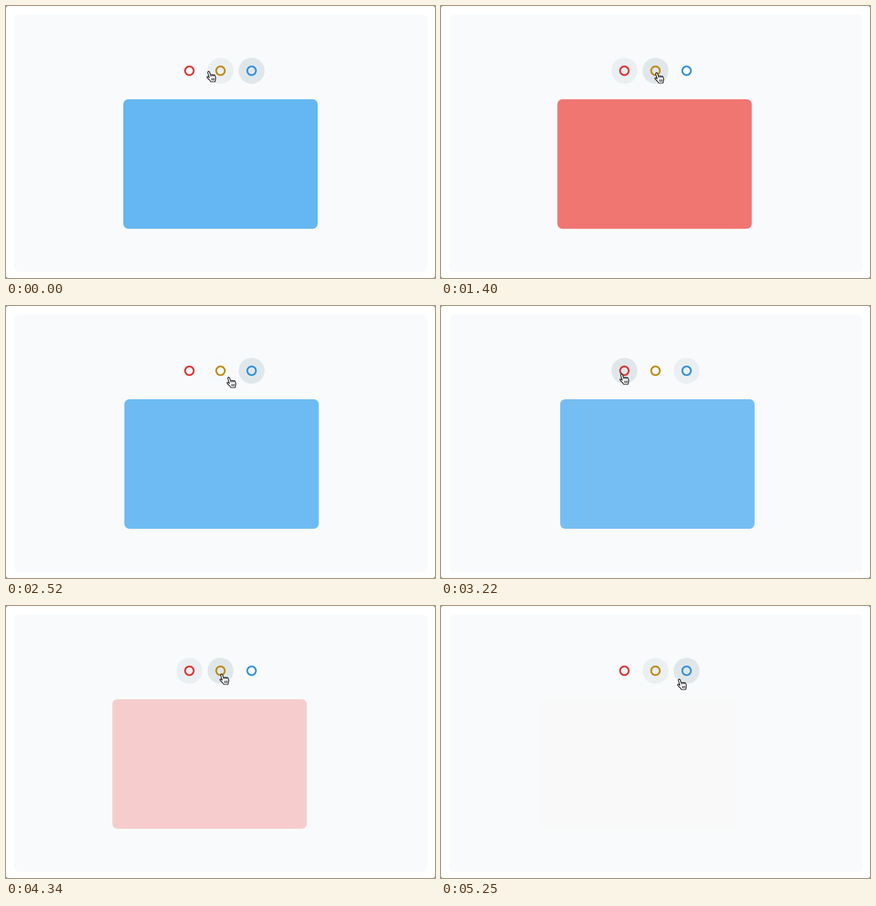
Recreate the animation shown at these times as an HTML page. Size 662 px wide and 420 px high, loop 5.32 s.

```html
<!DOCTYPE html>
<html lang="en">
<head>
<meta charset="utf-8">
<title>Card switcher</title>
<style>
  html, body { margin: 0; width: 100%; height: 100%; overflow: hidden; background: #555; }
  svg { display: block; }
</style>
</head>
<body>
<svg width="662" height="420" viewBox="0 0 662 420">
  <rect width="662" height="420" rx="3" fill="#fff"/>
  <rect x="13" y="13" width="638" height="398" rx="8" fill="#f8fafc"/>
  <g id="buttons"></g>
  <rect id="card" x="181" y="144" width="300" height="200" rx="8"/>
  <g id="hand" stroke="#111" stroke-linejoin="round" stroke-linecap="round">
    <path fill="#fff" stroke-width="1.2" d="M4.6 10.5L2.3 2.8Q2.2 1 3.6 .9Q4.7 .9 5.2 2.3L6.6 6.6Q7.6 5.6 8.8 6.5Q10 5.6 11.2 6.7Q12.8 6 13.6 7.6Q15 10.5 14.6 12.2L13.6 17H7Q5.5 14.2 2.6 12Q.6 10 1.2 9.2Q2.4 8.3 4.6 10.5Z"/>
    <path fill="none" stroke-width=".9" d="M6.6 6.6L7.2 8.8M8.8 6.5L9.4 8.6M11.2 6.7L11.6 8.6M8.2 11.8L8.7 14.6M10.2 11.6L10.5 14.6M12.2 11.4V14.4"/>
  </g>
</svg>
<script>
const LOOP = 5320, STEP = 70, LEAVE = 150, ENTER = 200, SHIFT = 25;
const RINGS = ['#dd302d', '#bd890c', '#2f8fd9'];
const CARDS = ['#f06e69', '#f2c231', '#64b7f2'];

// Button 0 is red, 1 yellow, 2 blue; fade is when the old button lets go.
const change = (from, to, press, leave, fade = leave + LEAVE) => ({ from, to, press, leave, fade });
const changes = [
  change(1, 2, -700, -600, 70),
  change(2, 0, 350, 478),
  change(0, 1, 1220, 1389),
  change(1, 2, 1920, 2233),
  change(2, 0, 3040, 3203),
  change(0, 1, 4000, 4281),
  change(1, 2, 4960, 5128)
];

// Cursor stops: time, x, y
const path = [
  [0, 309, 100], [320, 275, 104], [850, 275, 104], [1120, 329, 102],
  [1680, 329, 102], [1750, 329, 107], [1820, 384, 107], [2380, 384, 107],
  [2520, 340, 109], [3000, 275, 104], [3570, 275, 104], [3780, 364, 104],
  [3920, 329, 104], [4690, 329, 104], [4960, 364, 112], [LOOP, 364, 112]
];

const $ = id => document.getElementById(id);
const clamp = v => Math.min(1, Math.max(0, v));

// The CSS "ease" curve
function ease(x) {
  x = clamp(x);
  const bezier = (s, a, b) => 3 * (1 - s) ** 2 * s * a + 3 * (1 - s) * s * s * b + s ** 3;
  let lo = 0, hi = 1;
  for (let i = 0; i < 20; i++) {
    const mid = (lo + hi) / 2;
    if (bezier(mid, .25, .25) < x) lo = mid; else hi = mid;
  }
  return bezier(lo, .1, 1);
}

$('buttons').innerHTML = RINGS.map((color, i) => {
  const at = `cx="${283 + 48 * i}" cy="100"`;
  return `<circle id="back${i}" ${at} r="20" fill="#e0e7eb"/>
    <circle ${at} r="6.7" fill="none" stroke="${color}" stroke-width="2.6"/>`;
}).join('');

function drawButtons(t) {
  const level = [0, 0, 0];
  for (const c of changes) {
    if (t < c.press) break;
    level[c.to] = clamp((t - c.press) / STEP);
    if (t >= c.leave - 100) level[c.from] = .55 * (1 - ease((t - c.fade) / 200));
  }
  level.forEach((v, i) => $('back' + i).setAttribute('opacity', v));
}

function drawCard(t) {
  const c = changes.filter(c => c.leave <= t).pop();
  const dir = Math.sign(c.to - c.from), age = t - c.leave;
  const leaving = age < LEAVE;
  const p = leaving ? ease(age / LEAVE) : ease((age - LEAVE) / ENTER);
  const x = dir * SHIFT * (leaving ? -p : 1 - p);
  const card = $('card');
  card.setAttribute('fill', CARDS[leaving ? c.from : c.to]);
  card.setAttribute('opacity', leaving ? 1 - p : p);
  card.setAttribute('transform', `translate(${x})`);
}

function drawHand(t) {
  const i = path.findIndex(stop => stop[0] > t);
  const [t0, x0, y0] = path[i - 1], [t1, x1, y1] = path[i];
  const p = (t - t0) / (t1 - t0);
  $('hand').setAttribute('transform', `translate(${x0 + (x1 - x0) * p} ${y0 + (y1 - y0) * p})`);
}

const start = performance.now();
function frame() {
  const t = Math.floor((performance.now() - start) % LOOP / STEP) * STEP;
  drawButtons(t);
  drawCard(t);
  drawHand(t);
  requestAnimationFrame(frame);
}
frame();
</script>
</body>
</html>
```
